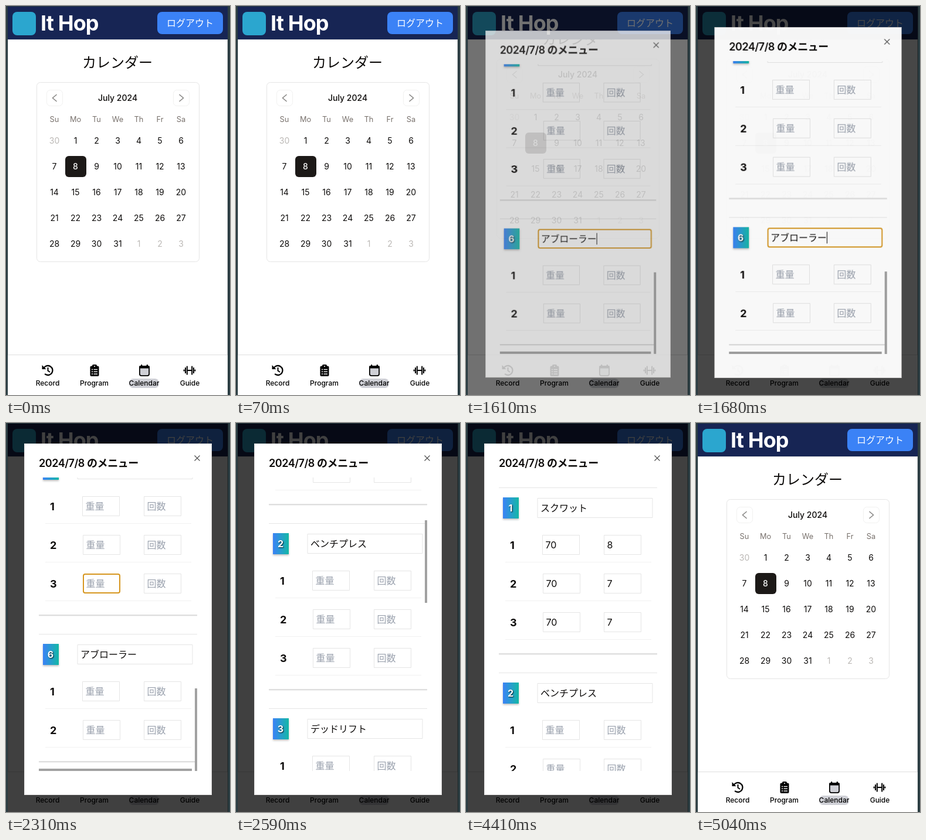
Recreate the animation shown at these times as an HTML page with a canvas. Size 382 px wide and 664 px high, loop 6090 ms.

```html
<!DOCTYPE html>
<html lang="ja">
<head>
<meta charset="utf-8">
<title>Training calendar</title>
<style>
html, body { margin: 0; width: 100%; height: 100%; overflow: hidden; background: #2b3d42; }
canvas { display: block; width: 382px; height: 664px; }
</style>
</head>
<body>
<canvas id="stage"></canvas>
<script>
(() => {
const W = 382, H = 664, LOOP = 6090;
const FONT = 'Inter, "Noto Sans CJK JP", "Noto Sans CJK", sans-serif';
const INK = '#0c0a09', LINE = '#e5e5e5', MUTED = '#9ca3af';
const VIEW = { x: 56, y: 93, w: 270, h: 501 };

const stage = document.getElementById('stage');
const layer = document.createElement('canvas');
const dpr = window.devicePixelRatio || 1;
for (const c of [stage, layer]) {
  c.width = W * dpr;
  c.height = H * dpr;
}
const main = stage.getContext('2d');
const sheet = layer.getContext('2d');
main.scale(dpr, dpr);
sheet.scale(dpr, dpr);
let g = main;

// Stepped tracks: [start time, value]
const OPEN = [[0, 0], [1540, .1], [1610, .74], [1680, .96], [1750, 1], [4970, .45], [5040, 0]];
const SCROLL = [[0, 1264], [2450, 1130], [2520, 680], [2590, 255], [2660, 60], [2730, 0]];
const BAR_V = [[0, 1], [3080, .75], [3150, .5], [3220, .25], [3290, 0]];
const BAR_H = [[0, 1], [2450, .66], [2520, .33], [2590, 0]];

function at(track, t) {
  let value = track[0][1];
  for (const [start, v] of track) if (t >= start) value = v;
  return value;
}

// Exercises with their sets: [weight, reps]
const blank = n => Array.from({ length: n }, () => ['', '']);
const menu = [
  { name: 'スクワット', sets: [['70', '8'], ['70', '7'], ['70', '7']] },
  { name: 'ベンチプレス', sets: blank(3) },
  { name: 'デッドリフト', sets: blank(3) },
  { name: 'ショルダープレス', sets: blank(2) },
  { name: 'レッグカール', sets: blank(3) },
  { name: 'アブローラー', sets: blank(2) }
];
let nextTop = 110;
for (const m of menu) {
  m.top = nextTop;
  m.end = m.top + 86 + 66 * m.sets.length;
  nextTop = m.end + 32;
}

function text(str, x, y, size, color = INK, weight = 400, align = 'left', spacing = 0) {
  g.font = `${weight} ${size}px ${FONT}`;
  g.letterSpacing = spacing + 'px';
  g.textAlign = align;
  g.fillStyle = color;
  g.fillText(str, x, y);
}

function fill(x, y, w, h, color, r = 0) {
  g.fillStyle = color;
  g.beginPath();
  g.roundRect(x, y, w, h, r);
  g.fill();
}

function frame(x, y, w, h, color = LINE, r = 0, width = 1) {
  g.strokeStyle = color;
  g.lineWidth = width;
  g.beginPath();
  g.roundRect(x + width / 2, y + width / 2, w - width, h - width, r);
  g.stroke();
}

function line(points, color, width = 1) {
  g.strokeStyle = color;
  g.lineWidth = width;
  g.beginPath();
  points.forEach(([x, y], i) => i ? g.lineTo(x, y) : g.moveTo(x, y));
  g.stroke();
}

function shadow(color, x, y, blur) {
  g.shadowColor = color;
  g.shadowOffsetX = x * dpr;
  g.shadowOffsetY = y * dpr;
  g.shadowBlur = blur * dpr;
}

function chevron(x, y, dir) {
  frame(x - 14, y - 14, 28, 28, '#f1f1f0', 6);
  line([[x - 3.5 * dir, y - 6], [x + 3.5 * dir, y], [x - 3.5 * dir, y + 6]], '#858482', 1.5);
}

function calendar() {
  text('カレンダー', 190, 105, 24, INK, 400, 'center');
  frame(52, 130, 278, 307, LINE, 6);
  chevron(83, 157, -1);
  chevron(299, 157, 1);
  text('July 2024', 190.5, 162, 14, INK, 500, 'center');
  ['Su', 'Mo', 'Tu', 'We', 'Th', 'Fr', 'Sa'].forEach((d, i) =>
    text(d, 82.5 + 36 * i, 198, 12.8, '#78716c', 400, 'center'));
  fill(101, 256, 36, 36, '#1c1917', 6);
  for (let i = 0; i < 35; i++) {
    const outside = i < 1 || i > 31;
    const day = i < 1 ? 30 : i > 31 ? i - 31 : i;
    const color = outside ? '#bbb8b5' : i === 8 ? '#fafaf9' : INK;
    text(day, 82.5 + 36 * (i % 7), 235 + 44 * Math.floor(i / 7), 14, color, i === 8 ? 500 : 400, 'center');
  }
}

function header() {
  fill(3, 1, 375, 56, '#172554');
  fill(11, 10, 40, 40, '#2ba6cf', 8);
  text('It Hop', 59, 42, 36, '#fff', 700, 'left', -.9);
  fill(258, 10, 112, 38, '#3b82f6', 8);
  text('ログアウト', 314, 35, 16, '#fff', 500, 'center');
}

function historyIcon(x, y) {
  g.strokeStyle = '#000';
  g.lineWidth = 2.3;
  g.beginPath();
  g.arc(x + .5, y, 8, -2.6, 2.3);
  g.stroke();
  g.fillStyle = '#000';
  g.beginPath();
  g.moveTo(x - 9.5, y - 9);
  g.lineTo(x - 9.5, y - 2);
  g.lineTo(x - 2.5, y - 2);
  g.fill();
  line([[x + .5, y - 5], [x + .5, y + .5], [x + 4, y + 3]], '#000', 2);
}

function clipboardIcon(x, y) {
  fill(x - 7.5, y - 7.5, 15, 17.5, '#000', 2);
  fill(x - 4, y - 10, 8, 6, '#000', 2);
  fill(x - 1, y - 8, 2, 2, '#fff', 1);
  for (let i = 0; i < 3; i++) {
    fill(x - 5, y - 2.5 + i * 3.8, 2, 2, '#fff', 1);
    fill(x - 1.5, y - 2.2 + i * 3.8, 6.5, 1.4, '#fff');
  }
}

function calendarIcon(x, y) {
  fill(x - 8, y - 6, 16, 15, '#cfd0d6', 3);
  frame(x - 9, y - 8, 18, 18, '#000', 3, 1.8);
  fill(x - 9, y - 8, 18, 4.5, '#000', 2);
  fill(x - 6, y - 10, 2.4, 4, '#000', 1);
  fill(x + 3.6, y - 10, 2.4, 4, '#000', 1);
}

function dumbbellIcon(x, y) {
  fill(x - 4, y - 1, 8, 2, '#000');
  for (const s of [-1, 1]) {
    for (const [dx, h] of [[4.2, 15], [7, 10], [9.4, 3]]) fill(x + s * dx - 1, y - h / 2, 2, h, '#000', .6);
  }
}

function tabs() {
  fill(3, 595, 375, 69, '#fff');
  fill(3, 595, 375, 1, '#dedede');
  fill(210, 636, 51, 16, '#cfd0d6', 7);
  historyIcon(71, 622);
  clipboardIcon(151, 622);
  calendarIcon(236, 622);
  dumbbellIcon(313, 622);
  [['Record', 71], ['Program', 150.5], ['Calendar', 235.5], ['Guide', 313.5]].forEach(([label, x]) =>
    text(label, x, 648, 12, '#000', 500, 'center'));
}

function page(lift) {
  fill(0, 0, W, H, '#2b3d42');
  fill(3, 1, 375, 663, '#fff');
  fill(3, 57, 1, 538, '#e4e4e4');
  fill(377, 57, 1, 538, '#e4e4e4');
  fill(3, 57, 375, 1, '#e2e2e2');
  g.save();
  g.translate(0, -lift);
  calendar();
  g.restore();
  header();
  tabs();
}

function field(x, y, w, value, hint, focused, caret) {
  frame(x, y, w, 34, focused ? '#d6961f' : LINE, focused ? 3 : 0, focused ? 2 : 1);
  text(value || hint, x + 5.5, y + 23, 16, value ? INK : MUTED);
  if (caret) fill(x + 5.5 + (value ? g.measureText(value).width : 0), y + 7, 1, 20, INK);
}

function badge(n, y) {
  const blend = g.createLinearGradient(63, 0, 90, 0);
  blend.addColorStop(0, '#3b82f6');
  blend.addColorStop(1, '#14b8a6');
  g.save();
  shadow('rgba(0,0,0,.25)', 0, 2, 3);
  fill(63, y, 27, 36, blend);
  shadow('rgba(0,0,0,.85)', 1, 1, 2);
  text(n, 76, y + 24, 16, '#fff', 700, 'center');
  g.restore();
}

function exercise(m, i, t) {
  const y = m.top;
  const nameFocus = i === 5 && t < 1820;
  fill(56, y, 270, 1, LINE);
  badge(i + 1, y + 17);
  field(121.5, y + 18, 197, m.name, '', nameFocus, nameFocus);
  m.sets.forEach(([weight, reps], k) => {
    const cy = y + 98 + 66 * k;
    const focus = i === 4 && k === 2 && t >= 1820;
    text(k + 1, 75, cy + 6.5, 18, INK, 700);
    field(k ? 131 : 130, cy - 17, 64, weight, '重量', focus, focus && t < 2310);
    field(235, cy - 17, 64, reps, '回数');
    fill(67, cy + 29, 249, 1, '#f1f1f1');
  });
  fill(56, m.end - 1, 270, 2, '#dedede');
  fill(56, m.end + 1, 270, 1, '#f2f2f2');
}

function dialog(t) {
  const scroll = at(SCROLL, t);
  fill(31, 35, 320, 600, '#fff');
  frame(31, 35, 320, 600, '#e7e5e4');
  text('2024/7/8 のメニュー', 56, 75, 18, INK, 600, 'left', -.45);
  line([[321.5, 55.5], [330.5, 64.5]], '#555', 1.3);
  line([[330.5, 55.5], [321.5, 64.5]], '#555', 1.3);

  g.save();
  g.beginPath();
  g.rect(VIEW.x, VIEW.y, VIEW.w, VIEW.h);
  g.clip();
  g.save();
  g.translate(0, -scroll);
  menu.forEach((m, i) => {
    if (m.top - scroll < 600 && m.end - scroll > 80) exercise(m, i, t);
  });
  g.restore();
  g.globalAlpha = at(BAR_V, t);
  fill(322, 94 + Math.round(scroll * 359 / 1264), 4, 141, '#a1a1a1');
  g.globalAlpha = at(BAR_H, t);
  fill(56, 590, 261, 4, '#a1a1a1');
  g.restore();
}

function render(t) {
  const shown = at(OPEN, t);
  g = main;
  page(shown ? 40 : 0);
  if (!shown) return;

  fill(3, 1, 375.5, 663, `rgba(0,0,0,${.75 * shown})`);
  g = sheet;
  g.clearRect(0, 0, W, H);
  dialog(t);

  // Zoom, slide and fade together
  g = main;
  const zoom = .95 + .05 * shown;
  g.save();
  g.globalAlpha = shown;
  g.translate(191, 335 + 12 * (1 - shown));
  g.scale(zoom, zoom);
  g.drawImage(layer, -191, -335, W, H);
  g.restore();
}

function tick() {
  render(performance.now() % LOOP);
  requestAnimationFrame(tick);
}
tick();
})();
</script>
</body>
</html>
```
